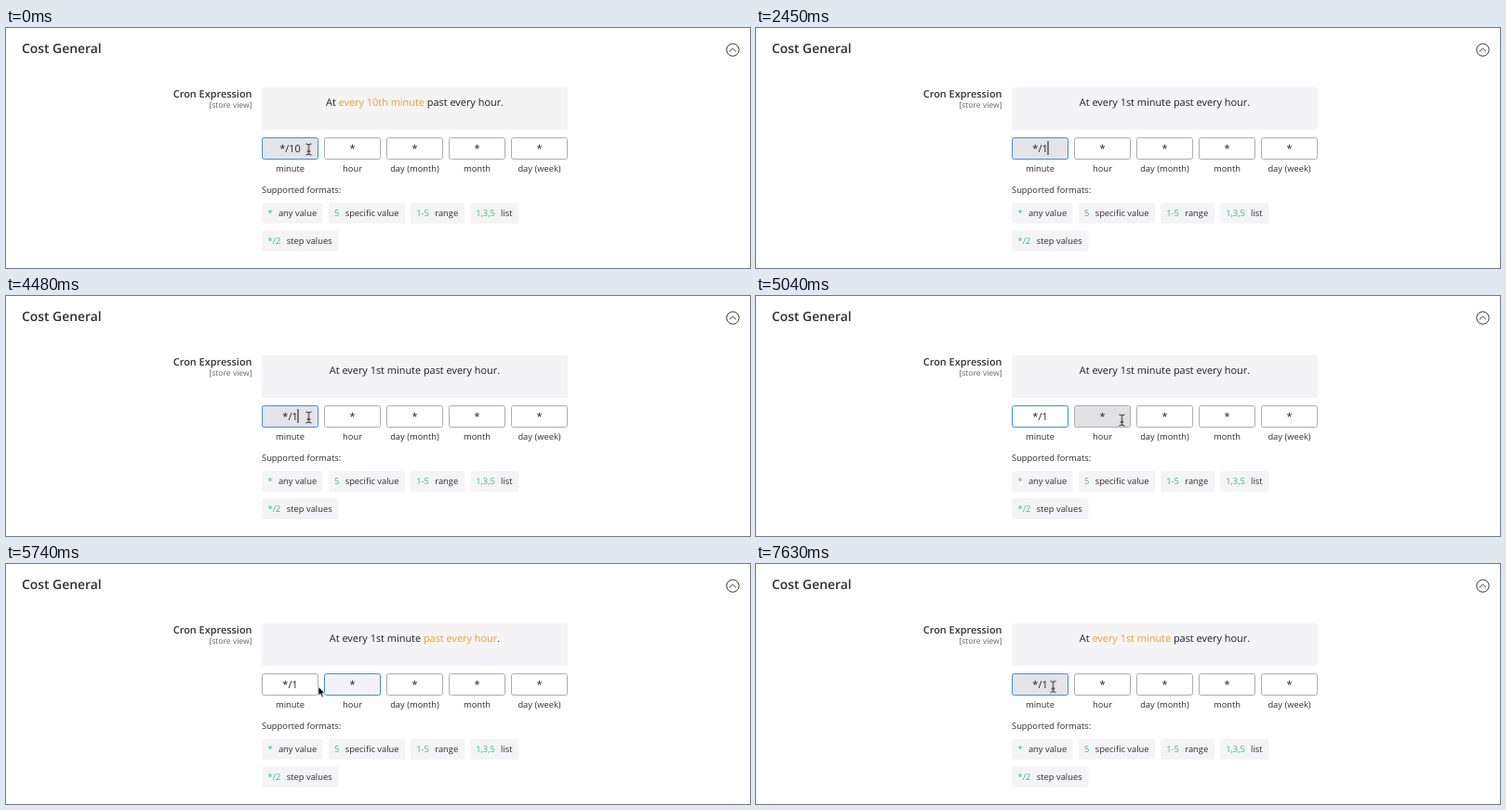
An HTML page that plays this animation: 800 by 259 pixels, repeating every 8 s.

```html
<!DOCTYPE html>
<html lang="en">
<head>
<meta charset="utf-8">
<title>Cron Expression</title>
<style>
  html, body { margin: 0; width: 100%; height: 100%; overflow: hidden; background: #fff; }
  svg { display: block; width: 100%; height: 100%; }
  text {
    font: 9.36px "Open Sans", "Noto Sans", sans-serif;
    fill: #303030;
    text-rendering: geometricPrecision;
  }
  .title { font-size: 13.9px; font-weight: 600; }
  .label { font-size: 10.92px; font-weight: 600; text-anchor: end; }
  .scope { font-size: 8.58px; fill: #666; text-anchor: end; }
  .mid { text-anchor: middle; }
  .big { font-size: 10.92px; fill: #1f1f1f; text-anchor: middle; }
  .hot { fill: #eea02b; }
  .code { fill: #2fc56d; }
  .field { fill: #fff; stroke: #adadad; }
  .panel { fill: #f4f4f4; }
  .caret { stroke: #111; }
  .icon { fill: none; stroke: #333; }

  .anim { animation: 8s step-end -10ms infinite; }
  .before { animation-name: before; }
  .after { animation-name: after; }
  .panel { animation-name: tint; }
  .first { animation-name: first; }
  .second { animation-name: second; }
  .minute { animation-name: minute; }
  .hour { animation-name: hour; }
  .blink { animation-name: blink; }
  .hour-blink { animation-name: hour-blink; }
  .pointer { animation-name: move, hide; }
  .beam { animation-name: beam; }
  .arrow { animation-name: arrow; }

  /* value edited */
  @keyframes before { 0% { visibility: visible } 30.625%, to { visibility: hidden } }
  @keyframes after { 0% { visibility: hidden } 30.625%, to { visibility: visible } }
  @keyframes tint { 0% { fill: #f4f4f4 } 30.625%, to { fill: #f4f4f7 } }

  /* highlighted part of the sentence */
  @keyframes first { 0% { fill: #1f1f1f } 76.125%, to { fill: #eea02b } }
  @keyframes second { 0% { fill: #1f1f1f } 64.75% { fill: #eea02b } 76.125%, to { fill: #1f1f1f } }

  /* hover and focus */
  @keyframes minute {
    0% { fill: #e4e4e7; stroke: #3f8fd8 }
    58.625% { fill: #fff; stroke: #3f8fd8 }
    64.75% { fill: #fff; stroke: #adadad }
    72.625% { fill: #e4e4e7; stroke: #adadad }
    76.125%, to { fill: #e4e4e7; stroke: #3f8fd8 }
  }
  @keyframes hour {
    0% { fill: #fff; stroke: #adadad }
    59.5% { fill: #e2e2e6; stroke: #adadad }
    64.75% { fill: #e2e2e6; stroke: #3f8fd8 }
    71.75% { fill: #f3f3f7; stroke: #3f8fd8 }
    76.125%, to { fill: #fff; stroke: #adadad }
  }

  @keyframes blink {
    0%, 10.5%, 23.625%, 36.75%, 49.875%, 62.125%, 82.25%, 95.375%, to { opacity: 0 }
    4.375%, 16.625%, 30.625%, 43.75%, 56%, 76.125%, 88.375% { opacity: 1 }
  }
  @keyframes hour-blink { 0%, 70.875%, to { opacity: 0 } 64.75% { opacity: 1 } }

  /* mouse */
  @keyframes move {
    0% { transform: translate(325.5px, 131px) }
    57.75% { transform: translate(325.5px, 131px); animation-timing-function: steps(6) }
    63% { transform: translate(393.5px, 134px) }
    67.375% { transform: translate(393.5px, 134px); animation-timing-function: steps(5) }
    71.75% { transform: translate(335.8px, 132.3px); animation-timing-function: steps(3) }
    74.375%, to { transform: translate(319.5px, 132.5px) }
  }
  @keyframes hide { 0%, 54.25%, to { opacity: 1 } 30.625% { opacity: 0 } }
  @keyframes beam {
    0%, 59.5%, 72.625%, to { visibility: visible }
    58.625%, 71.75% { visibility: hidden }
  }
  @keyframes arrow {
    0%, 59.5%, 72.625%, to { visibility: hidden }
    58.625%, 71.75% { visibility: visible }
  }
</style>
</head>
<body>
<svg viewBox="0 0 800 259">
  <text class="title" x="17" y="27.4">Cost General</text>
  <g class="icon">
    <circle cx="781.5" cy="23.6" r="6.7"/>
    <path d="M778 25.3l3.5-3.3 3.5 3.3"/>
  </g>

  <text class="label" x="264.5" y="75">Cron Expression</text>
  <text class="scope" x="264.5" y="86">[store view]</text>

  <rect class="anim panel" x="275" y="64" width="329" height="46" rx="1"/>
  <text class="big anim before" x="439.5" y="83.5">At <tspan class="hot">every 10th minute</tspan> past every hour.</text>
  <text class="big anim after" x="439.5" y="83.5">At <tspan class="anim first">every 1st minute</tspan> <tspan class="anim second">past every hour</tspan>.</text>

  <rect class="field anim minute" x="275.5" y="118.5" width="60" height="23" rx="2"/>
  <rect class="field anim hour" x="342.5" y="118.5" width="60" height="23" rx="2"/>
  <rect class="field" x="409.5" y="118.5" width="60" height="23" rx="2"/>
  <rect class="field" x="476.5" y="118.5" width="60" height="23" rx="2"/>
  <rect class="field" x="543.5" y="118.5" width="60" height="23" rx="2"/>

  <g class="anim before"><text class="big" x="305.5" y="134">*/10</text></g>
  <g class="anim after"><text class="big" x="305.5" y="134">*/1</text></g>
  <text class="big" x="372.5" y="134">*</text>
  <text class="big" x="439.5" y="134">*</text>
  <text class="big" x="506.5" y="134">*</text>
  <text class="big" x="573.5" y="134">*</text>

  <g class="caret anim blink">
    <path class="anim before" d="M317.5 122V137"/>
    <path class="anim after" d="M314 122V137"/>
  </g>
  <path class="caret anim hour-blink" d="M376 122V137"/>

  <text class="mid" x="305.5" y="154.5">minute</text>
  <text class="mid" x="372.5" y="154.5">hour</text>
  <text class="mid" x="439.5" y="154.5">day (month)</text>
  <text class="mid" x="506.5" y="154.5">month</text>
  <text class="mid" x="573.5" y="154.5">day (week)</text>

  <text x="275" y="178.4">Supported formats:</text>

  <g class="chips">
    <rect class="anim panel" x="275.3" y="189" width="65.2" height="22" rx="2"/>
    <text class="code" x="281.5" y="203.4">*</text><text x="292.9" y="203.4">any value</text>
    <rect class="anim panel" x="347" y="189" width="82.3" height="22" rx="2"/>
    <text class="code" x="353.1" y="203.4">5</text><text x="364.7" y="203.4">specific value</text>
    <rect class="anim panel" x="435" y="189" width="58.4" height="22" rx="2"/>
    <text class="code" x="441.2" y="203.4">1-5</text><text x="461.3" y="203.4">range</text>
    <rect class="anim panel" x="499.3" y="189" width="52.2" height="22" rx="2"/>
    <text class="code" x="505.2" y="203.4">1,3,5</text><text x="532.1" y="203.4">list</text>
    <rect class="anim panel" x="275.3" y="218.5" width="82.2" height="22.5" rx="2"/>
    <text class="code" x="281.5" y="233">*/2</text><text x="301.8" y="233">step values</text>
  </g>

  <g class="anim pointer">
    <g class="anim beam" fill="none" stroke-linecap="round">
      <path id="ibeam" d="M-2.8-6Q-.6-6 0-4.8Q.6-6 2.8-6M0-4.8V4.8M-2.8 6Q-.6 6 0 4.8Q.6 6 2.8 6M-1.6 2H1.6" stroke="#fff" stroke-width="2.2" stroke-opacity=".7"/>
      <path d="M-2.8-6Q-.6-6 0-4.8Q.6-6 2.8-6M0-4.8V4.8M-2.8 6Q-.6 6 0 4.8Q.6 6 2.8 6M-1.6 2H1.6" stroke="#111"/>
    </g>
    <path class="anim arrow" d="M0 0V9.8L2.2 7.8 3.8 11.4 5.5 10.7 4 7.1H7.1Z" fill="#000" stroke="#fff" stroke-width=".8"/>
  </g>
</svg>
</body>
</html>
```
